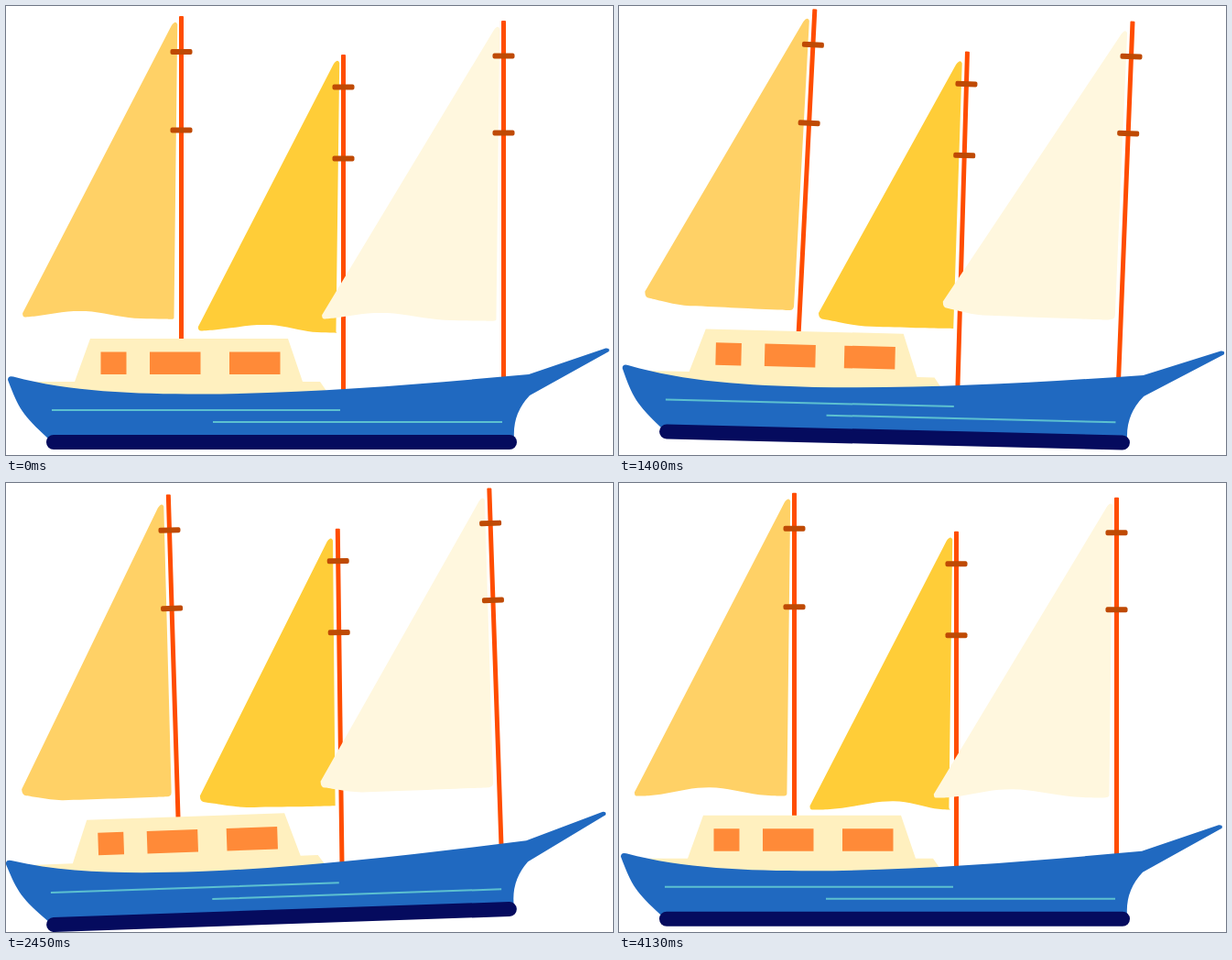
Write an HTML page that moves like this. It is 663 px wide and 490 px high and loops after 4200 ms.

```html
<!DOCTYPE html>
<html lang="en">
<head>
<meta charset="utf-8">
<title>Sailing boat</title>
<style>
  html, body { margin: 0; width: 100%; height: 100%; overflow: hidden; background: #fff; }
  svg { display: block; width: 100%; height: 100%; }
</style>
</head>
<body>
<svg viewBox="0 0 663 490">
  <g id="boat">
    <g id="rig"></g>
    <path fill="#fff0bf" d="M92 363H308L324 410H343L350 420V425H28V410H75Z"/>
    <path fill="#ff8a38" d="M103.5 377.5h28v24.5h-28zM157 377.5h55.5v24.5H157zM244 377.5h55.5v24.5H244z"/>
    <path fill="#2069c0" d="M2 408Q2 403 8 404.5C70 421 140 423.5 212 423.5C330 423 450 413 571 402L655 373.5Q660 373 658.5 377L572 425Q553 445 555 472H46C18 446 14 440 2 408Z"/>
    <path fill="none" stroke="#5cc0d0" stroke-width="2" d="M50 441H365M226 454H542"/>
    <rect x="44" y="468" width="514" height="16" rx="8" fill="#050b5e"/>
  </g>
</svg>
<script>
const LOOP = 4200, STEP = 70, FLUTTER = 1050, DECK = 440, FOOT_STEPS = 12;

// Each gust is [start, peak, end] in ms; force is the tilt in degrees at its peak
const masts = [
  { x: 191.5, top: 11, pivot: 191.5, firstArm: 39, armGap: 85.5, color: '#ffd166', width: 174, height: 330,
    lean: 0, force: 2.2, gusts: [[0, 1050, 1960], [2270, 3150, 4100]] },
  { x: 368.5, top: 53, pivot: 303, firstArm: 35.5, armGap: 78, color: '#ffcd38', width: 159.5, height: 303,
    lean: -.1, force: 2.87, gusts: [[0, 700, 1575], [2120, 2850, 3900]] },
  { x: 543.5, top: 16, pivot: 543.5, firstArm: 38.5, armGap: 84, color: '#fff7de', width: 199, height: 327,
    lean: .04, force: 2.55, gusts: [[0, 800, 1800], [2400, 3200, 4100]] }
];

const clamp = v => Math.min(1, Math.max(0, v));
const ease = (t, from, to) => (1 - Math.cos(Math.PI * clamp((t - from) / (to - from)))) / 2;
const bump = (t, [start, peak, end]) => ease(t, start, peak) - ease(t, peak, end);

const roll = t => 2 * ease(t, 0, 1000) - 4 * ease(t, 1000, 2550) + 2 * ease(t, 2550, 3850);
const bob = t => -7.4 * (bump(t, [0, 1050, 2130]) + bump(t, [2030, 3150, 4260]));
const sway = (m, t) => m.force * m.gusts.reduce((sum, gust) => sum + bump(t, gust), 0);

const pt = ([x, y]) => `${x.toFixed(2)} ${y.toFixed(2)} `;

// Catmull-Rom spline continuing from the first point
function spline(points) {
  let d = '';
  for (let i = 0; i < points.length - 1; i++) {
    const p = points[i], q = points[i + 1];
    const before = points[i - 1] || p, after = points[i + 2] || q;
    d += 'C' + pt(p.map((v, n) => v + (q[n] - before[n]) / 6))
      + pt(q.map((v, n) => v - (after[n] - p[n]) / 6)) + pt(q);
  }
  return d;
}

function sailPath(m, phase) {
  const slack = Math.sin(Math.PI * phase) ** 8;
  const lift = Math.cos(2 * Math.PI * (phase - .28));
  const head = 7 + 12.5 * slack;
  const tackY = .7 - 10.5 * slack ** 2, clewY = -1.8 - 4.5 * lift;
  const tack = .065, clew = .975 - .03 * lift;

  // A hump rolls along the foot and fades while the corners lift
  const humpAt = .64 + 1.5 * (phase > .5 ? phase - 1 : phase);
  const humpHeight = 8.5 * Math.cos(Math.PI * (phase + .05)) ** 4;
  const footY = f => tackY * clamp((.37 - f) / (.37 - tack))
    + clewY * clamp((f - .76) / (clew - .76))
    - humpHeight * Math.cos(Math.PI / 2 * Math.min(1, Math.abs(f - humpAt) / .4)) ** 2;

  const place = (f, y) => [
    m.x - m.width * (f + m.lean * 4 * f * Math.max(0, 1 - f)),
    m.top + m.height + y
  ];
  const foot = Array.from({ length: FOOT_STEPS + 1 }, (_, i) => {
    const f = tack + (clew - tack) * i / FOOT_STEPS;
    return place(f, footY(f));
  });
  const first = foot[0], last = foot[FOOT_STEPS];
  const luff = [m.x - 6.5 - 1.5 * humpHeight / 8, first[1] - 1.5 - 4 * Math.sin(Math.PI * phase)];
  const leech = place(.993 - .018 * lift, -7 - 6.5 * lift);
  const hx = m.x - 7.3 - .28 * (head - 7), hy = m.top + head;

  return 'M' + pt([hx - 3.5, hy + 3.5]) + 'Q' + pt([hx + 1, hy - 3]) + pt([hx + 3, hy + 2])
    + 'L' + pt(luff) + 'Q' + pt([luff[0], first[1]]) + pt(first)
    + spline(foot) + 'Q' + pt([leech[0], last[1]]) + pt(leech) + 'Z';
}

function add(parent, tag, attrs) {
  const node = document.createElementNS('http://www.w3.org/2000/svg', tag);
  for (const name in attrs) node.setAttribute(name, attrs[name]);
  return parent.appendChild(node);
}

const boat = document.getElementById('boat'), rig = document.getElementById('rig');

for (const m of masts) {
  m.group = add(rig, 'g', {});
  add(m.group, 'rect', { x: m.x - 2.5, y: m.top, width: 5, height: DECK - m.top, rx: 1, fill: '#ff4d00' });
  m.sail = add(m.group, 'path', { fill: m.color });
  for (const y of [m.firstArm, m.firstArm + m.armGap])
    add(m.group, 'rect', { x: m.x - 12, y: m.top + y - 3, width: 24, height: 6, rx: 2, fill: '#bf4a04' });
}

function draw(t) {
  boat.setAttribute('transform', `translate(0 ${bob(t)}) rotate(${roll(t)} 295 476)`);
  for (const m of masts) {
    m.group.setAttribute('transform', `rotate(${sway(m, t)} ${m.pivot} ${DECK})`);
    m.sail.setAttribute('d', sailPath(m, t % FLUTTER / FLUTTER));
  }
}

const start = performance.now();
function tick() {
  const elapsed = (performance.now() - start) % LOOP;
  draw(Math.floor(elapsed / STEP) * STEP);
  requestAnimationFrame(tick);
}
tick();
</script>
</body>
</html>
```
